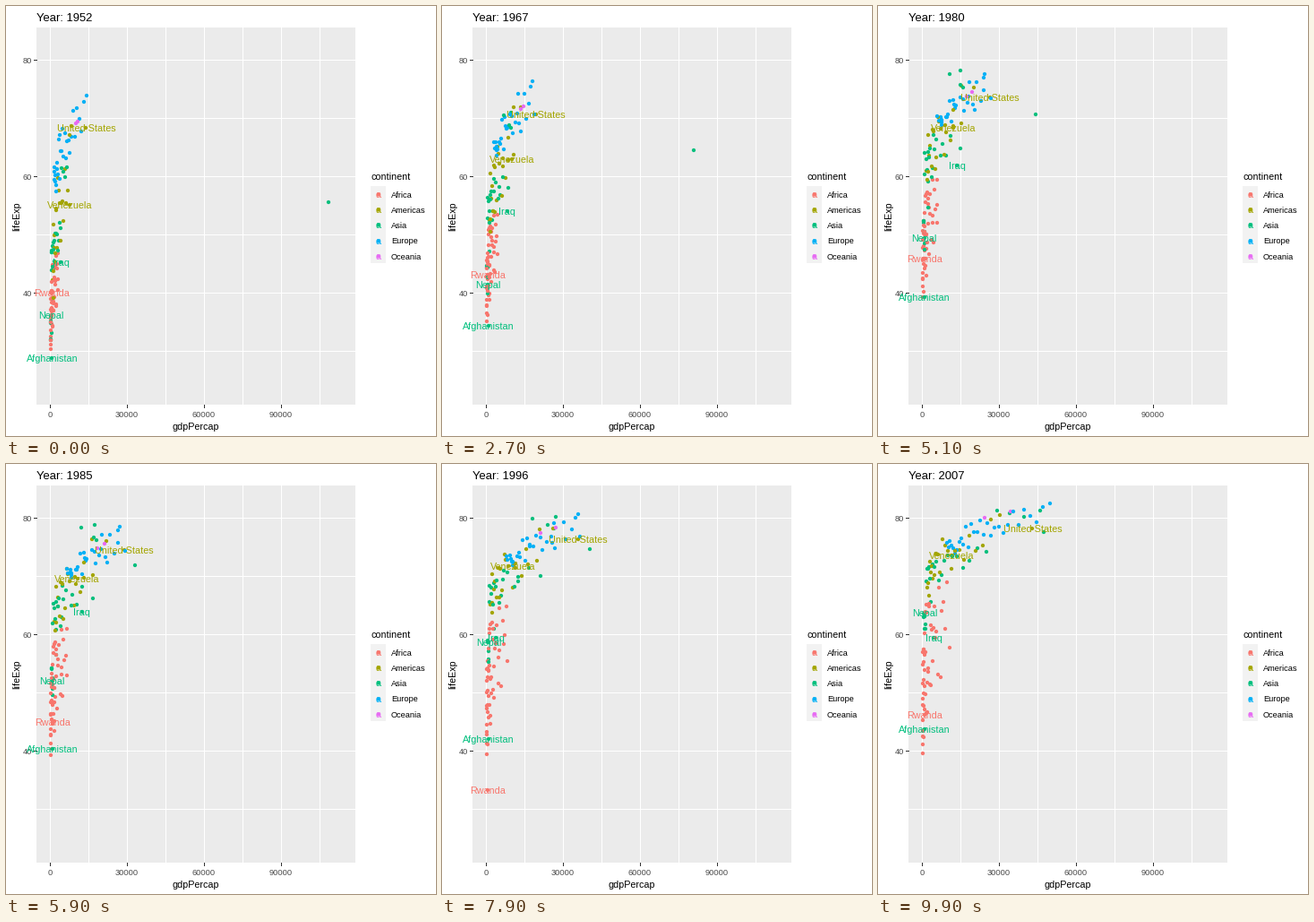
Write a matplotlib script that moves like this. It is 480x480 px and loops after 10 s.

```python
import numpy as np
import matplotlib.pyplot as plt
from matplotlib.animation import FuncAnimation
from matplotlib.patches import Rectangle

plt.rcParams["font.family"] = ["Liberation Sans", "DejaVu Sans"]

SIZE, DPI = 480, 72
FRAMES, START, END = 100, 1952, 2007
LEFT, TOP, RIGHT, BOTTOM = 34, 24, 390, 445
ERAS = (1952, 1980, 2007)
COLORS = {"Africa": "#F8766D", "Americas": "#A3A500", "Asia": "#00BF7D",
          "Europe": "#00B0F6", "Oceania": "#E76BF3"}
rng = np.random.default_rng(7)


def px(gdp):
    return 49.2 + 0.002868 * np.asarray(gdp)


def py(life):
    return 60.8 + 6.49 * (80 - np.asarray(life))


class Cloud:
    """Countries of one continent: log-spread wealth, health tied to wealth.

    Typical wealth, its spread, typical age and its spread are given per era;
    link is the correlation between wealth and health.
    """

    def __init__(self, n, link, gdp, gdp_spread, life, life_spread):
        self.rules = [np.log(gdp), gdp_spread, life, life_spread]
        self.rank = np.linspace(-1.7, 1.7, n)
        luck = rng.permutation(np.linspace(-1.5, 1.5, n))
        self.health = link * self.rank + np.sqrt(1 - link ** 2) * luck
        self.drift = 0.15 * rng.standard_normal(n)

    def at(self, year):
        mu, sigma, life, spread = (np.interp(year, ERAS, r) for r in self.rules)
        turn = np.sin(np.pi * (year - START) / (END - START))
        return (np.exp(mu + sigma * (self.rank + turn * self.drift)),
                life + spread * (self.health - turn * self.drift))


CLOUDS = {
    "Africa": Cloud(51, 0.6, (900, 1300, 1500), (0.75, 0.9, 1.15),
                    (39, 50, 55), (4.5, 5.5, 8)),
    "Americas": Cloud(23, 0.8, (3000, 6000, 7800), (0.6, 0.65, 0.8),
                      (53, 66.5, 73.2), (7.5, 4.5, 3.5)),
    "Asia": Cloud(29, 0.85, (1300, 3300, 5500), (0.95, 1.05, 1.25),
                  (46.5, 62, 71), (8, 7.5, 5.5)),
    "Europe": Cloud(30, 0.85, (4700, 13000, 22000), (0.65, 0.45, 0.48),
                    (64.8, 72.3, 77.8), (4.8, 2.4, 2.5)),
    "Oceania": Cloud(2, 1, (10300, 18300, 29000), (0.02, 0.03, 0.1),
                     (69.3, 74.1, 80.7), (0.1, 0.2, 0.3)),
}

# Turning points (year, gdp, life) of the countries that can be told apart
NAMED = {
    "Afghanistan": ("Asia", [(1952, 779, 28.8), (1982, 978, 39.9), (2007, 975, 43.8)]),
    "Iraq": ("Asia", [(1952, 4130, 45.3), (1972, 9576, 57), (1977, 14688, 60.4),
                      (1987, 11643, 65), (1992, 3746, 59.5), (2007, 4471, 59.5)]),
    "Nepal": ("Asia", [(1952, 546, 36.2), (1967, 676, 41.5),
                       (1997, 1011, 59.4), (2007, 1091, 63.8)]),
    "Rwanda": ("Africa", [(1952, 493, 40), (1982, 882, 46.2), (1987, 848, 44),
                          (1992, 737, 23.6), (1997, 590, 36.1), (2007, 863, 46.2)]),
    "United States": ("Americas", [(1952, 13990, 68.4), (1967, 19530, 70.8),
                                   (1987, 29884, 75), (2007, 42952, 78.2)]),
    "Venezuela": ("Americas", [(1952, 7690, 55.1), (1962, 8423, 60.8),
                               (1977, 13144, 67.5), (1987, 9884, 70.2),
                               (2007, 11416, 73.7)]),
    "Kuwait": ("Asia", [(1952, 108382, 55.6), (1957, 113523, 58), (1967, 80895, 64.6),
                        (1972, 109348, 67.7), (1982, 31354, 71.3), (2007, 47307, 77.6)]),
}
LABELS = [name for name in NAMED if name != "Kuwait"]


def positions(year):
    """Pixel positions of all countries, the named ones first."""
    gdp, life = [], []
    for _, keys in NAMED.values():
        years, g, l = zip(*keys)
        gdp.append([np.interp(year, years, g)])
        life.append([np.interp(year, years, l)])
    for cloud in CLOUDS.values():
        g, l = cloud.at(year)
        gdp.append(g)
        life.append(l)
    return px(np.concatenate(gdp)), py(np.concatenate(life))


fig = plt.figure(figsize=(SIZE / DPI, SIZE / DPI), dpi=DPI, facecolor="white")
ax = fig.add_axes([0, 0, 1, 1])
ax.set_xlim(0, SIZE)
ax.set_ylim(SIZE, 0)
ax.axis("off")


def box(x, y, w, h, color):
    return ax.add_patch(Rectangle((x, y), w, h, fc=color, lw=0, zorder=0))


def line(x, y, color):
    ax.plot(x, y, color=color, lw=1, antialiased=False, zorder=1,
            solid_capstyle="butt")


def text(x, y, s, size=10.8, color="black", **kw):
    return ax.text(x, y, s, fontsize=size, color=color, zorder=4, **kw)


def dots(x, y, colors):
    return ax.scatter(x, y, s=4.3 ** 2, c=colors, linewidths=0, zorder=3)


panel = box(LEFT, TOP, RIGHT - LEFT, BOTTOM - TOP, "#EBEBEB")
for gdp in range(0, 106000, 15000):
    x = int(px(gdp))
    line([x, x], [TOP, BOTTOM], "white")
    if gdp % 30000 == 0:
        line([x, x], [BOTTOM, BOTTOM + 3], "#333333")
        text(x, 459, str(gdp), 9.2, "#4D4D4D", ha="center")
for life in range(30, 81, 10):
    y = int(py(life))
    line([LEFT, RIGHT], [y, y], "white")
    if life % 20 == 0:
        line([LEFT - 3, LEFT], [y, y], "#333333")
        text(29, y + 4, str(life), 9.2, "#4D4D4D", ha="right")
text(212, 473, "gdpPercap", ha="center")
text(12, 235, "lifeExp", rotation=90, ha="center", va="center")

text(407, 194, "continent")
box(407, 201, 17, 86, "#F2F2F2")
for i, (cont, color) in enumerate(COLORS.items()):
    y = 209.9 + 17.28 * i
    dots([415], [round(y)], [color])
    text(415.4, y + 4, "a", color=color, ha="center")
    text(430, y + 3.6, cont, 9.2)

title = text(34, 17, "", 13)
shades = [COLORS[cont] for cont, _ in NAMED.values()]
for cont, cloud in CLOUDS.items():
    shades += [COLORS[cont]] * len(cloud.rank)
order = rng.permutation(len(shades))
points = dots(*[p[order] for p in positions(START)], [shades[i] for i in order])
labels = [text(0, 0, name, color=COLORS[NAMED[name][0]], ha="center")
          for name in LABELS]
for label in labels:
    label.set_clip_path(panel)


def update(frame):
    year = START + (END - START) * frame / (FRAMES - 1)
    x, y = positions(year)
    points.set_offsets(np.round(np.column_stack([x, y]))[order])
    for label, lx, ly in zip(labels, x, y):
        label.set_position((lx, ly + 4))
    title.set_text(f"Year: {round(year)}")
    return [points, title, *labels]


anim = FuncAnimation(fig, update, frames=FRAMES, interval=100,
                     repeat=True, repeat_delay=0, blit=False)
plt.show()
```
